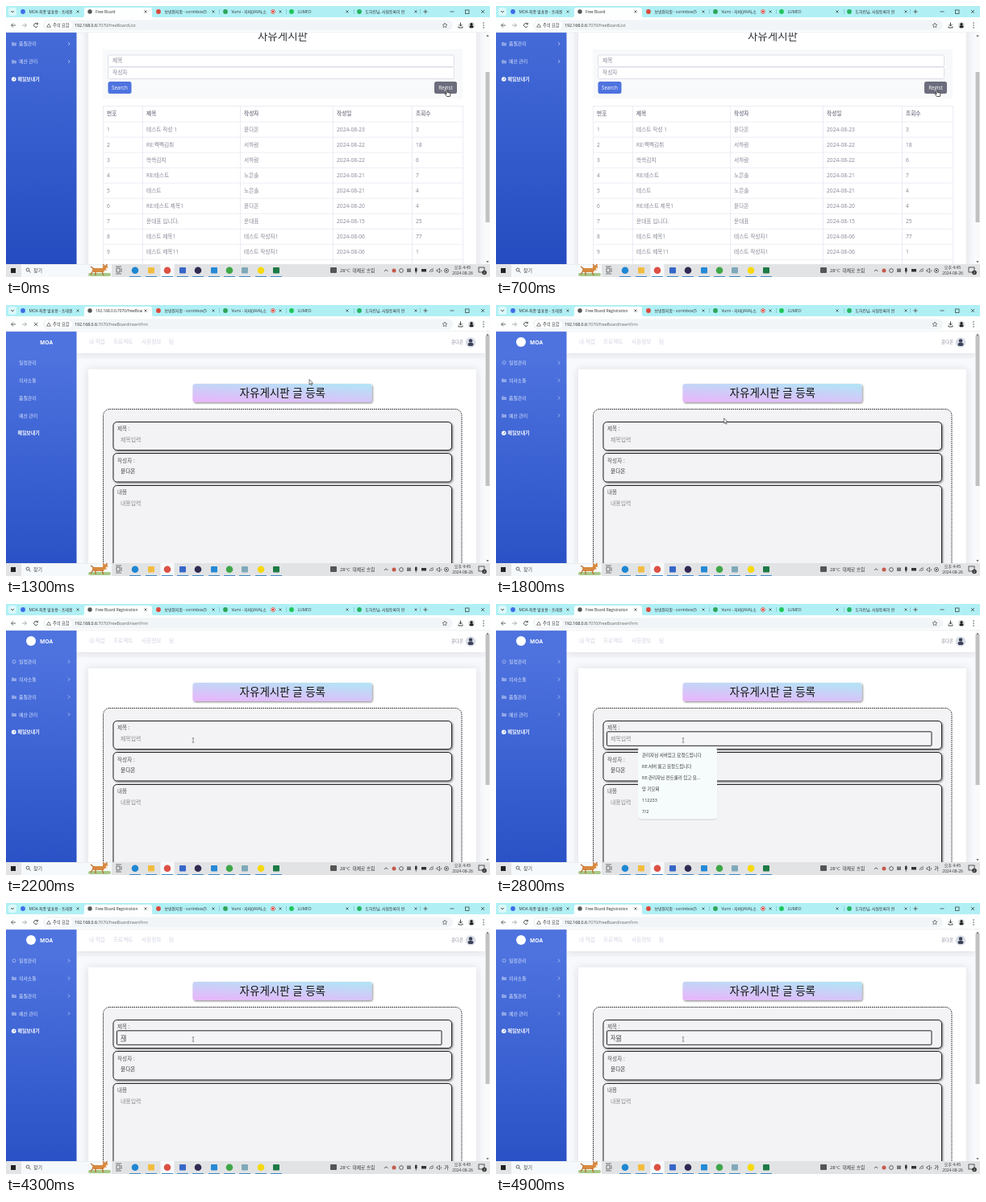
An HTML page for the animation above (5 s loop, 600 by 337 pixels).

```html
<!DOCTYPE html>
<html lang="ko">
<head>
<meta charset="utf-8">
<style>
html, body { margin: 0; width: 100%; height: 100%; overflow: hidden; background: #fff; }
svg { display: block; width: 100%; height: 100%; font-family: 'Open Sans', 'Noto Sans CJK KR', 'Noto Sans CJK', sans-serif; }
text { white-space: pre; }
</style>
</head>
<body>
<svg id="stage" viewBox="0 0 600 337"></svg>
<script>
const LOOP = 5000;
const GREY = '#858796', INK = '#33363c';

const rect = (x, y, w, h, fill, extra = '') =>
  `<rect x="${x}" y="${y}" width="${w}" height="${h}" fill="${fill}" ${extra}/>`;
const circle = (x, y, r, fill, extra = '') =>
  `<circle cx="${x}" cy="${y}" r="${r}" fill="${fill}" ${extra}/>`;
const path = (d, stroke = '#444', width = 0.8, extra = '') =>
  `<path d="${d}" fill="none" stroke="${stroke}" stroke-width="${width}" ${extra}/>`;
// y is the vertical middle of the line of text
const text = (x, y, str, size, fill = GREY, extra = '') =>
  `<text x="${x}" y="${y + size * 0.36}" font-size="${size}" fill="${fill}" ${extra}>${str}</text>`;
const group = (id, body, extra = '') => `<g id="${id}" ${extra}>${body}</g>`;
const cross = (x, y, r = 1.7) =>
  path(`M${x - r} ${y - r}l${2 * r} ${2 * r}m0 ${-2 * r}l${-2 * r} ${2 * r}`, '#333', 0.7);
const BOLD = 'font-weight="700"', MIDDLE = 'text-anchor="middle"';

const defs = `<defs>
  <linearGradient id="blue" x1="0" y1="0" x2="0" y2="1">
    <stop offset=".1" stop-color="#4e73df"/><stop offset="1" stop-color="#2a52c6"/></linearGradient>
  <linearGradient id="blueLow" x1="0" y1="0" x2="0" y2="1">
    <stop offset="0" stop-color="#456bd8"/><stop offset="1" stop-color="#244cc0"/></linearGradient>
  <linearGradient id="banner" x1="0.25" y1="1" x2="0.75" y2="0">
    <stop offset="0" stop-color="#e5b8fa"/><stop offset="1" stop-color="#b5e2f6"/></linearGradient>
  <filter id="soft" x="-10%" y="-10%" width="120%" height="130%">
    <feDropShadow dx="0" dy="1" stdDeviation="5" flood-color="#3a3b45" flood-opacity=".17"/></filter>
  <filter id="near" x="-5%" y="-5%" width="110%" height="110%">
    <feDropShadow dx="0" dy=".6" stdDeviation=".7" flood-color="#000" flood-opacity=".25"/></filter>
  <filter id="drop" x="-5%" y="-10%" width="110%" height="130%">
    <feDropShadow dx="1.2" dy="1.2" stdDeviation=".8" flood-color="#000" flood-opacity=".45"/></filter>
  <clipPath id="view"><rect x="0" y="33" width="600" height="288.5"/></clipPath>
  <clipPath id="tabTitle"><rect x="111" y="0" width="58" height="14"/></clipPath>
</defs>`;

function browserBar() {
  const tabs = [
    [21, '#3f6ee8', 'MOA 최종 발표용 - 프레젠', 89],
    [189, '#dc4a3d', '보낸편지함 - sorimbox(5', 257],
    [272, '#2fa55a', 'Vumi - 자바(JAVA),소', 340],
    [354, '#1fc65b', 'LUMEO', 423],
    [438, '#28b463', '도하린님, 사원등록이 완', 508]
  ];
  let s = rect(0, 0, 600, 14.5, '#b0f0f5') + rect(0, 14, 600, 19, '#fdfefe');
  s += rect(3, 2, 10, 10, '#dcf9fb', 'rx="3"') + path('M6 6l2 2 2-2', '#333');
  s += '<path d="M94 14.5q3 0 3-3V5q0-3 3-3h78q3 0 3 3v6.5q0 3 3 3z" fill="#fdfefe"/>';
  for (const [x, color, title, close] of tabs) {
    s += circle(x, 7, 2.9, color) + text(x + 7.5, 7, title, 4.9, INK) + cross(close, 7, 1.5);
  }
  s += circle(104, 7, 2.7, '#555') + cross(173, 7, 1.5);
  s += circle(331, 7, 2.4, '#fff', 'stroke="#d93025" stroke-width=".8"') + circle(331, 7, 1.2, '#d93025');
  for (const x of [264, 347, 431, 513]) s += rect(x, 4, 0.6, 6, '#6fb9c0');
  s += path('M517.5 7h5M520 4.5v5M550.5 7h5') + cross(591, 7, 2);
  s += rect(569.5, 5, 4.5, 4.5, 'none', 'stroke="#333" stroke-width=".7"');
  s += path('M12 24H6.5m2.5-2.5L6.5 24 9 26.5') + path('M20 24h5.5m-2.5-2.5l2.5 2.5-2.5 2.5', '#999');
  s += rect(46, 17.5, 521, 13, '#f1f5f7', 'rx="6.5"').replace('521', '508');
  s += rect(48, 19, 34, 10, '#fff', 'rx="5"');
  s += path('M53 22l2.5 4.2h-5z', '#333', 0.6) + text(58, 24, '주의 요함', 5.2, INK);
  s += path('M544 21l.9 2 2.1.2-1.6 1.4.5 2.1-1.9-1.1-1.9 1.1.5-2.1-1.6-1.4 2.1-.2z', '#444', 0.6);
  s += path('M563.5 20.5V25m-2-2l2 2 2-2M561 25.500v1.5h5v-1.5', '#333', 0.9);
  s += circle(577, 24, 4, '#d8dde1') + circle(577, 22.8, 1.7, '#222') + rect(574.5, 24.2, 5, 3, '#222', 'rx="1.5"');
  s += [21, 24, 27].map(y => circle(592, y, 0.7, '#333')).join('');
  s += rect(0, 32.6, 600, 0.5, '#dde1e6');
  const address = (id, page) => group(id, text(85, 23.8,
    `<tspan fill="#222">192.168.0.6</tspan>:7070/${page}`, 5.2, '#666'));
  s += address('urlList', 'freeBoardList') + address('urlForm', 'freeBoardInsertFrm');
  s += '<g clip-path="url(#tabTitle)"><text id="pageTitle" x="111" y="8.8" font-size="4.8" fill="#333"></text></g>';
  s += group('reload', path('M39 22.3a2.5 2.5 0 1 0 .4 2.5m0-4v2h-2', '#444', 0.9)) +
    group('stop', cross(37, 24, 2.2));
  return s;
}

const folder = (x, y) => `<path d="M${x - 3} ${y - 2}h2.2l.7.7h3v3.8h-5.9z" fill="#fff" opacity=".4"/>`;
const gauge = (x, y) => circle(x, y, 2.8, '#fff') + path(`M${x} ${y + 1}l1.2-2.3`, '#4469d5', 0.9);

function menu(items, icons) {
  let s = '';
  for (const [name, y] of items) {
    const mail = name === '메일보내기';
    s += text(mail ? 14.5 : 16, y, name, 5.9, mail ? '#fff' : '#dce4fa', mail ? BOLD : '');
    icons.push(mail ? gauge(9.7, y)
      : (name === '일정관리' ? circle(10, y, 2, 'none', 'stroke="#a9bcf0" stroke-width=".9"') : folder(10, y)) +
        path(`M77 ${y - 2}l2 2-2 2`, '#c3d0f5', 0.8));
  }
  return s;
}

function scrollBar(top, bottom) {
  return rect(594, 33, 6, 288, '#fafafa') + rect(594.5, top, 5, bottom - top, '#c1c1c1') +
    '<path d="M597 35.5l1.7 2.5h-3.4zM597 319.5l1.7-2.5h-3.4z" fill="#777"/>';
}

function listPage() {
  const icons = [];
  const columns = [120, 169, 290, 405, 503, 566];
  const rows = [
    ['번호', '제목', '작성자', '작성일', '조회수'],
    [1, '테스트 작성 1', '윤다온', '2024-08-23', 3],
    [2, 'RE:쩩쩩김취', '서하람', '2024-08-22', 18],
    [3, '쓱쓱김치', '서하람', '2024-08-22', 6],
    [4, 'RE:테스트', '노은솔', '2024-08-21', 7],
    [5, '테스트', '노은솔', '2024-08-21', 4],
    [6, 'RE:테스트 제목1', '윤다온', '2024-08-20', 4],
    [7, '문대표 입니다.', '문대표', '2024-08-15', 25],
    [8, '테스트 제목1', '테스트 작성자1', '2024-08-06', 77],
    [9, '테스트 제목11', '테스트 작성자1', '2024-08-06', 1]
  ];
  let s = rect(0, 33, 600, 289, '#f8f9fc') + rect(102, 0, 481, 345, '#fff', 'filter="url(#soft)"');
  s += rect(0, 33, 87.5, 289, 'url(#blueLow)');
  s += menu([['품질관리', 47], ['예산 관리', 69], ['메일보내기', 91]], icons) + icons.join('');
  s += text(343, 37, '자유게시판', 13.5, INK, MIDDLE);
  s += rect(120, 54, 446, 61, '#f8f9fa');
  ['제목', '작성자'].forEach((label, i) => {
    s += rect(126.5, 61 + i * 15, 429, 14.5, '#fff', 'rx="2" stroke="#d1d3e2" stroke-width=".7"') +
      text(132, 68 + i * 15, label, 6.7);
  });
  s += rect(126.5, 94, 29, 15, '#4e73df', 'rx="2.5"') + text(141, 101.5, 'Search', 6.3, '#fff', MIDDLE);
  s += rect(531, 94, 28, 15, '#6b6d7d', 'rx="2.5"') + text(545, 101.5, 'Regist', 6.3, '#fff', MIDDLE);
  rows.forEach((row, i) => {
    const y = i ? 134.2 + i * 19.02 : 133.5;
    row.forEach((cell, c) => { s += text(columns[c] + 5, y, cell, 6.7, GREY, i ? '' : BOLD); });
    s += rect(120, 143.7 + i * 19.02, 446, 0.7, '#e3e6f0');
  });
  s += rect(120, 124, 446, 0.7, '#e3e6f0');
  for (const x of columns) s += rect(x, 124, 0.7, 200, '#e3e6f0');
  return s + scrollBar(82, 269);
}

function formPage() {
  const icons = [circle(31, 46, 6, '#fff')];
  let s = rect(0, 33, 600, 289, '#f8f9fc');
  s += rect(87, 28, 507, 32, '#fff', 'filter="url(#soft)"') + rect(102, 80, 481, 265, '#fff', 'filter="url(#soft)"');
  s += rect(0, 33, 87.5, 289, 'url(#blue)') + text(50, 46.3, 'MOA', 6.6, '#fff', `${BOLD} ${MIDDLE}`);
  s += menu([['일정관리', 71.7], ['의사소통', 93.6], ['품질관리', 115.5], ['예산 관리', 137.4], ['메일보내기', 159.3]], icons);
  s += group('icons', icons.join(''));
  for (const [x, name] of [[103, '내 작업'], [133, '프로젝트'], [168, '사원정보'], [202, '팀']]) {
    s += text(x, 46, name, 6.6, '#d1d3e2');
  }
  s += text(552, 46.5, '윤다온', 5.5) + circle(576, 46.5, 6.3, '#d9dee8') +
    circle(576, 44.5, 2.3, '#3c4257') + rect(572.5, 47, 7, 4, '#3c4257', 'rx="2"');
  s += rect(231.5, 98, 222, 23, 'url(#banner)', 'rx="3" filter="url(#drop)"');
  s += text(342.8, 109, '자유게시판 글 등록', 13.5, '#111', MIDDLE);
  s += rect(120.5, 129.5, 444.5, 220, '#f3f2f5', 'rx="8" stroke="#222" stroke-width="1" stroke-dasharray="1.5 1"');
  for (const [y, h] of [[145.5, 35], [184.5, 35.5], [224.5, 120]]) {
    s += rect(133, y, 419.5, h, '#f3f2f5', 'rx="4.5" stroke="#222" stroke-width="1" filter="url(#drop)"');
  }
  s += text(138, 153.7, '제목 :', 6.6, '#555') + text(138, 193.5, '작성자 :', 6.6, '#555') + text(138, 232.8, '내용', 6.6, '#555');
  s += text(142, 207, '윤다온', 6.7, '#333') + text(142, 246.2, '내용입력', 6.9, '#8b8b8f');
  s += group('focus', rect(137.5, 158.8, 402.5, 17.5, '#f5f4f7', 'rx="1" stroke="#222" stroke-width="1"'));
  s += group('hint', text(142, 167.2, '제목입력', 6.9, '#8b8b8f'));
  s += '<text id="typed" x="142" y="170" font-size="6.9" fill="#333"></text>';
  s += group('caret', path('M0 172h6.2V164', '#333', 0.6));
  const past = ['관리자님 서버입고 요청드립니다', 'RE:서버 롱고 요청드립니다', 'RE:관리자님 컨트롤러 입고 요...', '망 기모찌', '112233', '7/2'];
  s += group('history', rect(176, 178.5, 98, 89, '#f6fbfb', 'rx="4" filter="url(#near)"') +
    past.map((line, i) => text(181, 188 + i * 14, line, 5.5, '#333')).join(''));
  return s + scrollBar(38, 225);
}

function taskBar() {
  const apps = [[160, '#1f87d2'], [180, '#f2bd3f'], [200, '#dc5144'], [219, '#3567c8'], [238, '#302a52'],
    [258, '#2489d6'], [277, '#3fa648'], [296, '#7fa9b9'], [316, '#f5d90a'], [335, '#1d7a45']];
  const squares = [180, 219, 258, 296, 335];
  let s = rect(0, 321, 600, 16, '#e2e3e5') + rect(6, 326, 6, 6, '#222');
  s += rect(19, 321.5, 112, 15.5, '#f6f9fb') + circle(27, 328, 2, 'none', 'stroke="#333" stroke-width=".7"') +
    path('M28.5 329.5l2 2', '#333') + text(34, 329, '찾기', 6, '#444');
  // illustrated dog in the search field
  s += rect(102, 332, 28, 4, '#a8c987', 'rx="2"') + rect(107, 326, 15, 5, '#d8893f', 'rx="2.5"') +
    circle(123, 325.5, 3.2, '#d8893f') + circle(125, 326.7, 1.3, '#fff2df') +
    path('M108 329l-3 5m6-4v5m8-5l2 5m-12-8l-4-3M121 323l-.5-2m4 2l.8-2', '#b96d2d', 1.3);
  s += path('M137 326h4v5h-4zm6 0v5M136 324h7m-7 9h7', '#444', 0.7);
  s += rect(191.5, 321, 17, 16, '#f8f9fa');
  for (const [x, color] of apps) {
    s += squares.includes(x) ? rect(x - 4, 325, 8, 7.5, color, 'rx="1"') : circle(x, 328.7, 4.3, color);
    s += rect(x - 7, 336, 14, 1, '#3f89c4');
  }
  s += rect(402, 325, 8, 7, '#555', 'rx="1"') + text(414, 329, '28°C  대체로 흐림', 5.7, '#333') +
    path('M469 330l2.2-2.2 2.2 2.2', '#333');
  s += circle(481, 329, 2.5, '#c55b4b') + circle(490, 329, 2.4, 'none', 'stroke="#444" stroke-width=".8"') +
    rect(497, 326.5, 5, 4.5, '#777') + rect(507, 325.5, 2.6, 5, '#333', 'rx="1.3"') + path('M508.3 330v2.5', '#333') +
    rect(515, 327, 6, 3.5, '#333') + path('M525.5 331q0-4 4.5-4m-2.5 4q0-2 2.5-2', '#444') +
    path('M534 328h1.5l2-2v6l-2-2H534zm5 0q1.5 1.2 0 2.6', '#444', 0.7);
  s += group('imeOff', circle(546, 329, 2.6, 'none', 'stroke="#444" stroke-width=".7"') + cross(546, 329, 1.2)) +
    group('imeOn', text(546, 329, '가', 6.2, '#222', MIDDLE));
  s += text(566, 325, '오후 4:45', 5, '#333', MIDDLE) + text(566, 332.6, '2024-08-26', 4.9, '#333', MIDDLE);
  s += rect(586, 325, 7, 6, 'none', 'stroke="#333" stroke-width=".8"') + circle(593, 331.5, 2.8, '#333') +
    text(593, 331.5, '2', 4, '#fff', MIDDLE);
  return s;
}

const pointers =
  group('hand', '<path d="M-1 0q.8-1 1.5 0v2.5l3 .8q.7.3.5 1.3l-.7 2.9h-3.8l-2.5-3 .7-.7 1.3.9z" fill="#fff" stroke="#111" stroke-width=".7"/>') +
  group('arrow', '<path d="M0-2.5v6.5l1.5-1.3 1 2.2 1-.5-1-2.1h2z" fill="#fff" stroke="#222" stroke-width=".6"/>') +
  group('beam', path('M-1.2-2.7h2.4M0-2.7v5.4M-1.2 2.7h2.4', '#333', 0.5));

const stage = document.getElementById('stage');
stage.innerHTML = defs + group('list', listPage(), 'clip-path="url(#view)"') +
  group('form', formPage(), 'clip-path="url(#view)"') + browserBar() + taskBar() + group('pointer', pointers);

const part = id => document.getElementById(id);
const show = (id, on) => part(id).setAttribute('visibility', on ? 'inherit' : 'hidden');
const lastAt = (steps, t) => steps.filter(([at]) => at <= t).pop();

const TYPING = [[0, ''], [3700, 'ㅈ'], [4300, '자'], [4700, '자ㅇ'], [4800, '자유']];
const TITLES = [[0, 'Free Board'], [1100, '192.168.0.6:7070/freeBoardInsertFrm'], [1500, 'Free Board Registration']];
const TRACK = [[0, 547, 105], [900, 547, 105], [1300, 376, 95], [1500, 376, 95], [2000, 232, 169.5], [LOOP, 232, 169.5]];

function pointerAt(t) {
  const i = TRACK.findIndex(([at]) => at > t);
  const [t0, x0, y0] = TRACK[i - 1], [t1, x1, y1] = TRACK[i];
  const p = (t - t0) / (t1 - t0), k = p * p * (3 - 2 * p);
  return [x0 + (x1 - x0) * k, y0 + (y1 - y0) * k];
}

function draw(now) {
  const t = Math.floor((now % LOOP) / 100) * 100;
  const onForm = t >= 1200, loaded = t >= 1500, focused = t >= 2700;
  const typed = lastAt(TYPING, t)[1];
  const [x, y] = pointerAt(t);

  show('list', !onForm);
  show('form', onForm);
  show('urlList', t < 1100);
  show('urlForm', t >= 1100);
  show('stop', t >= 1100 && !loaded);
  show('reload', t < 1100 || loaded);
  show('icons', onForm && loaded);
  part('pageTitle').textContent = lastAt(TITLES, t)[1];

  show('focus', onForm && focused);
  show('hint', onForm && !typed);
  part('typed').textContent = typed;
  show('caret', onForm && typed);
  part('caret').setAttribute('transform', `translate(${142 + (typed.length - 1) * 6.35} 0)`);
  show('history', t >= 2800 && t < 4000);
  part('history').setAttribute('opacity', t < 3800 ? 1 : t < 3900 ? 0.85 : 0.4);
  show('imeOn', focused);
  show('imeOff', !focused);

  const overField = onForm && x < 540 && y > 159;
  const overButton = !onForm && t <= 900;
  part('pointer').setAttribute('transform', `translate(${x} ${y})`);
  show('hand', overButton);
  show('beam', overField);
  show('arrow', !overButton && !overField);
}

const start = performance.now();
function tick() {
  draw(performance.now() - start);
  requestAnimationFrame(tick);
}
draw(0);
tick();
</script>
</body>
</html>
```
